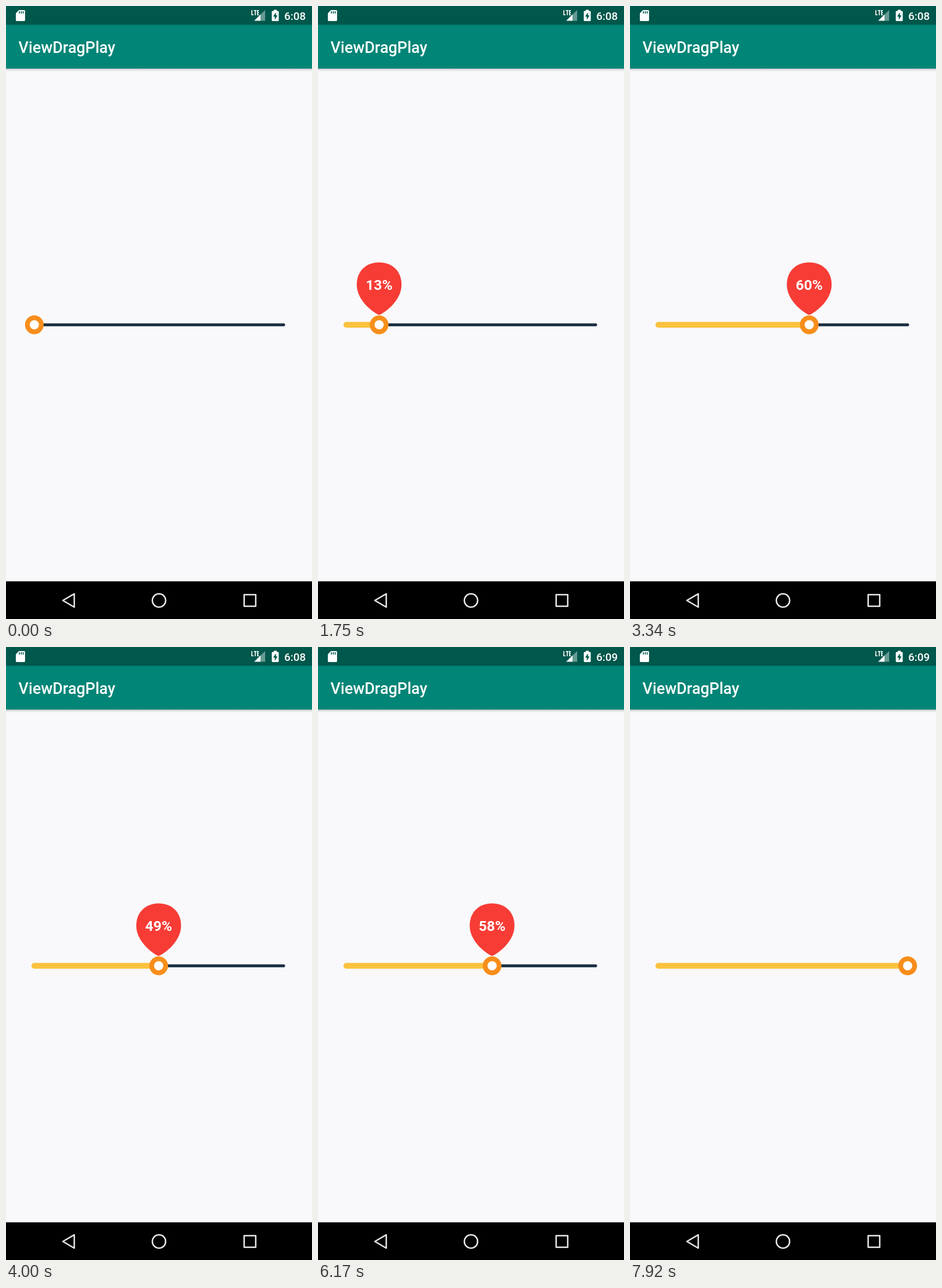
An HTML page for the animation above (8000 ms loop, 529 by 1058 pixels).

```html
<!DOCTYPE html>
<html lang="en">
<head>
<meta charset="utf-8">
<title>Drag slider</title>
<style>
  html, body { margin: 0; width: 100%; height: 100%; overflow: hidden; background: #f9f9fb; }
  svg { display: block; width: 100%; height: 100%; }
  text { font-family: Roboto, "Noto Sans", sans-serif; font-weight: 500; fill: #fff; }
</style>
</head>
<body>
<svg viewBox="0 0 529 1058">
  <defs>
    <linearGradient id="shade" x2="0" y2="1">
      <stop stop-color="#000" stop-opacity=".3"/>
      <stop offset=".4" stop-color="#000" stop-opacity=".1"/>
      <stop offset="1" stop-color="#000" stop-opacity="0"/>
    </linearGradient>
  </defs>
  <rect width="529" height="1058" fill="#f9f9fb"/>

  <!-- App bar -->
  <rect y="107.5" width="529" height="6" fill="url(#shade)"/>
  <rect width="529" height="108" fill="#008577"/>
  <rect width="529" height="32.4" fill="#00574b"/>
  <text x="21.5" y="81" font-size="27">ViewDragPlay</text>

  <!-- Status icons -->
  <path d="M22.5 7H31.5Q33 7 33 8.700V24.300Q33 26 31.500 26H18.500Q17 26 17 24.300V12.500Z" fill="#fff"/>
  <path d="M23.300 9V13M26.500 9V13M29.700 9V13" stroke="#00574b" stroke-width="1.600"/>
  <path d="M440 14.800L448 7V25.500H440Z" fill="#fff" opacity=".4"/>
  <path d="M429 25.500L440 14.500V25.500Z" fill="#fff"/>
  <path d="M425 7V15.200H428M428.500 7.800H433.300M430.900 7V16M437.200 7.800H434.900V15.200H437.200M434.900 11.400H437" fill="none" stroke="#fff" stroke-width="1.600"/>
  <path d="M463 6.500H468V8.500H470Q471.500 8.500 471.500 10V24.500Q471.500 26 470 26H461Q459.500 26 459.500 24.500V10Q459.500 8.500 461 8.500H463Z" fill="#fff"/>
  <path d="M466.700 11L461.800 18.200H464.700V23.800L469.400 16.300H466.700Z" fill="#00574b"/>
  <text id="clock" x="481" y="23.500" font-size="18.900"></text>

  <!-- Slider -->
  <path d="M49 550.200H480" stroke="#1a2e42" stroke-width="5" stroke-linecap="round"/>
  <path id="progress" stroke="#fcc23e" stroke-width="10" stroke-linecap="round"/>
  <g id="thumb">
    <circle cy="550.200" r="12.100" fill="#fff" stroke="#f78e1b" stroke-width="8.200"/>
    <g id="bubble">
      <path d="M0 533.300C-11 529-38.700 508-38.700 481C-38.700 457-22 442.500 0 442.500S38.700 457 38.700 481C38.700 508 11 529 0 533.300Z" fill="#f63c35"/>
      <text id="percent" y="489.700" font-size="24.700" text-anchor="middle" style="font-weight:700"></text>
    </g>
  </g>

  <!-- Navigation bar -->
  <rect y="993" width="529" height="65" fill="#000"/>
  <g fill="none" stroke="#e9e9e9" stroke-width="2.500" stroke-linejoin="round">
    <path d="M98.300 1026L118 1014.500V1037.500Z"/>
    <circle cx="264.500" cy="1026" r="11.500"/>
    <rect x="411.700" y="1016" width="20" height="20"/>
  </g>
</svg>
<script>
  const LOOP = 8000, START = 49, SPAN = 431;
  const [clock, progress, thumb, bubble, percent] =
    ["clock", "progress", "thumb", "bubble", "percent"].map(id => document.getElementById(id));

  // Keys are [time in ms, value].
  const drag = [[1500, 0], [2540, 0.6465], [2850, 0.68], [4000, 0.4988], [4800, 0.2603], [5700, 0.2603], [6750, 1]];
  const fade = [[1250, 0], [1550, 1], [4880, 1], [5380, 0], [5480, 0], [5780, 1], [6990, 1], [7490, 0]];

  const linear = u => u;
  const easeInOut = u => u * u * (3 - 2 * u);

  function sample(keys, t, ease) {
    const next = keys.findIndex(([time]) => time > t);
    if (next === 0) return keys[0][1];
    if (next < 0) return keys[keys.length - 1][1];
    const [t0, a] = keys[next - 1], [t1, b] = keys[next];
    return a + (b - a) * ease((t - t0) / (t1 - t0));
  }

  // Blends linear and eased travel, so the finger slows without stopping at each key.
  const handMotion = u => 0.6 * linear(u) + 0.4 * easeInOut(u);

  function render(t) {
    const value = sample(drag, t, handMotion);
    const x = START + SPAN * value;
    thumb.setAttribute("transform", `translate(${x} 0)`);
    progress.setAttribute("d", `M${START} 550.2H${x}`);
    bubble.setAttribute("opacity", sample(fade, t, linear));
    percent.textContent = Math.floor(value * 100) + "%";
    clock.textContent = t < 4600 ? "6:08" : "6:09";
  }

  const begin = performance.now();
  function tick() {
    render((performance.now() - begin) % LOOP);
    requestAnimationFrame(tick);
  }
  tick();
</script>
</body>
</html>
```
